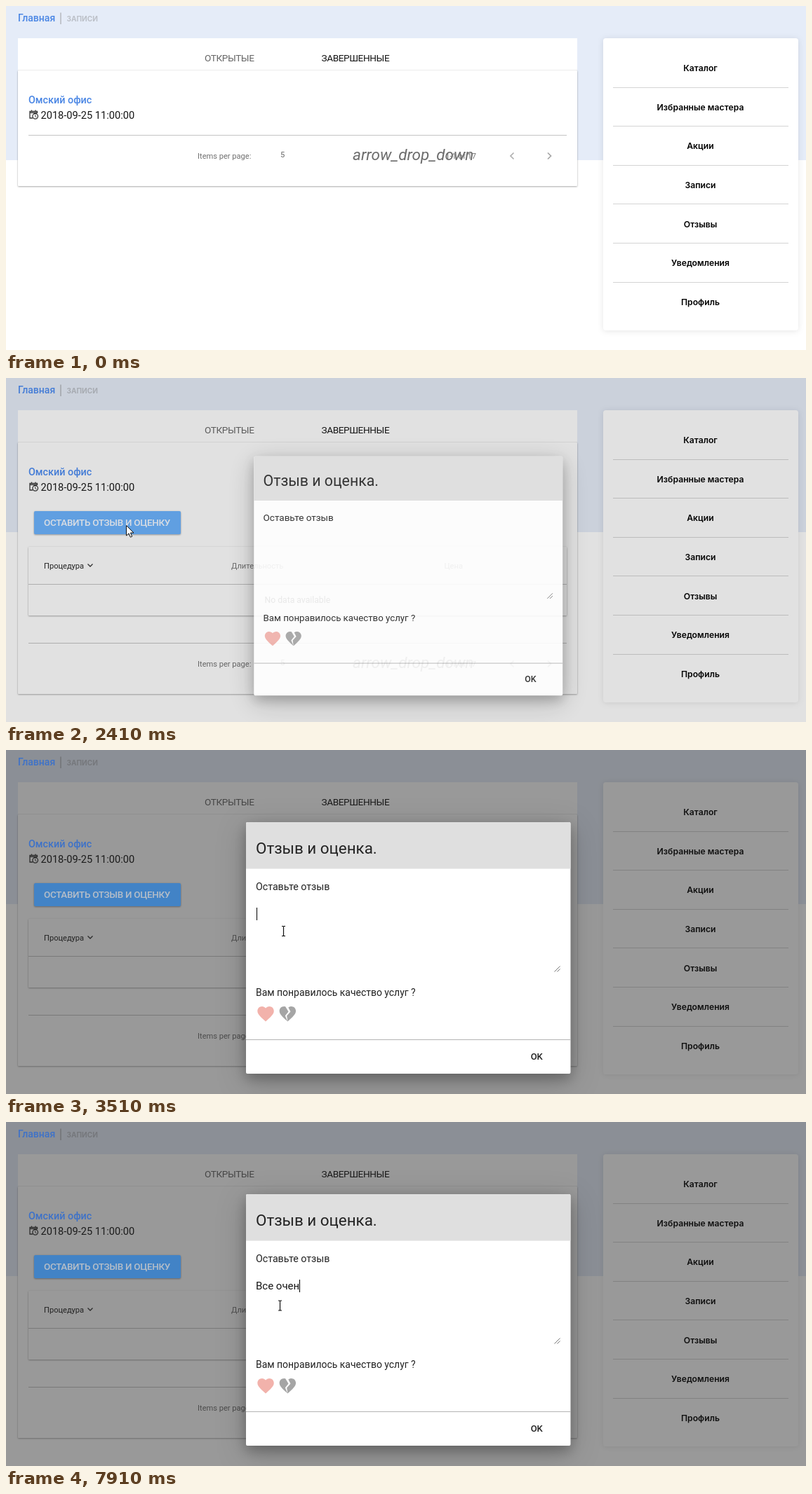
An HTML page for the animation above (8000 ms loop, 1140 by 491 pixels).

```html
<!DOCTYPE html>
<html lang="ru">
<head>
<meta charset="utf-8">
<title>Записи</title>
<style>
html, body { margin: 0; width: 100%; height: 100%; overflow: hidden; background: #fff; }
svg { display: block; width: 1140px; height: 491px; font-family: Roboto, sans-serif; }
text { white-space: pre; }
.card { fill: #fff; filter: drop-shadow(0 1px 1px rgba(0,0,0,.3)) drop-shadow(0 0 1px rgba(0,0,0,.08)); }
.soft { fill: #fff; filter: drop-shadow(0 1px 4px rgba(0,0,0,.1)); }
.modal { fill: #fff; filter: drop-shadow(0 7px 9px rgba(0,0,0,.24)) drop-shadow(0 9px 20px rgba(0,0,0,.2)); }
.menu { font: 600 12.2px Inter, sans-serif; text-anchor: middle; }
.tab { font-size: 13.6px; letter-spacing: -.4px; }
.small { font-size: 11.1px; }
.line { fill: none; stroke: #c4c4c4; }
.chev { fill: none; stroke-width: 1.7; }
</style>
</head>
<body>
<svg id="stage" viewBox="0 0 1140 491">
  <rect width="1140" height="220" fill="#e5ecf8"/>
  <path d="M78 9.5V26" stroke="#b3b5ba" stroke-width="1.4"/>
  <text x="86.5" y="22" font-size="10.1" font-weight="700" font-family="Inter, sans-serif" fill="#bcc0c8">ЗАПИСИ</text>

  <rect class="card" id="panel" x="17" y="92" width="797" height="165" rx="1"/>
  <rect x="17" y="46" width="797" height="46" fill="#fff"/>
  <path d="M17 91.5H814" stroke="#ececec"/>
  <text class="tab" x="283" y="79" fill="#666">ОТКРЫТЫЕ</text>
  <text class="tab" x="449.5" y="79" fill="#161616">ЗАВЕРШЕННЫЕ</text>
  <g fill="none" stroke="#333" stroke-width="1.3">
    <path d="M38 160H34V150.5H44.5V153M34 152.3H44.500M36.500 148.5V151M42 148.5V151"/>
    <circle cx="41.7" cy="157.3" r="3.8"/>
    <path d="M41.7 155.3V157.6L43.3 158.5" stroke-width="1"/>
  </g>
  <text x="49.5" y="160.5" font-size="14.6" fill="#161616">2018-09-25 11:00:00</text>

  <g id="details">
    <rect class="card" x="32" y="241" width="767" height="98" rx="1"/>
    <path class="line" d="M32 294.500H799"/>
    <text class="small" x="54" y="271.5" fill="#222">Процедура</text>
    <path d="M116.500 265.500L120 269L123.500 265.500" fill="none" stroke="#333" stroke-width="1.3"/>
    <text class="small" x="321" y="271.5" fill="#777">Длительность</text>
    <text class="small" x="624.5" y="271.5" fill="#777">Цена</text>
    <text x="368.5" y="320.5" font-size="12.2" fill="#222">No data available</text>
  </g>

  <g id="pager">
    <path class="line" d="M32 184.500H799"/>
    <text class="small" x="273" y="217.5" fill="#707070">Items per page:</text>
    <text class="small" x="391" y="216" fill="#666">5</text>
    <text class="small" x="670" y="217.5" text-anchor="end" fill="#707070">1-1 of 17</text>
    <text x="494" y="220" font-size="22.5" font-style="italic" fill="#6c6c6c">arrow_drop_down</text>
    <path class="chev" d="M723.500 209.500L719 214L723.500 218.500" stroke="#b0b0b0"/>
    <path class="chev" d="M772 209.500L776.500 214L772 218.500" stroke="#a6a6a6"/>
  </g>

  <rect class="soft" x="851" y="46" width="278" height="417" rx="4"/>
  <g id="menu"></g>

  <rect id="shade" width="1140" height="491" fill="#212121"/>

  <g id="links" font-weight="500">
    <text x="17" y="22" font-size="14">Главная</text>
    <text x="32" y="139" font-size="14.3">Омский офис</text>
  </g>
  <g id="button">
    <rect class="card" id="face" x="40" y="190" width="209" height="33" rx="2"/>
    <rect id="flash" x="40" y="190" width="209" height="33" rx="2" fill="#fff"/>
    <text id="label" x="54" y="211.3" font-size="13.4" font-weight="500" letter-spacing="-.28">ОСТАВИТЬ ОТЗЫВ И ОЦЕНКУ</text>
  </g>

  <g id="dialog">
    <rect class="modal" x="342" y="103" width="462.5" height="359" rx="2"/>
    <path d="M342 169.500V105a2 2 0 0 1 2-2H802.500a2 2 0 0 1 2 2V169.500Z" fill="#dfdfdf"/>
    <text x="356" y="147.5" font-size="22.4" fill="#222">Отзыв и оценка.</text>
    <text x="356" y="199.5" font-size="14.2" fill="#222">Оставьте отзыв</text>
    <text id="typed" x="356" y="239" font-size="15" fill="#161616"></text>
    <rect id="caret" y="225" width="1" height="18" fill="#000"/>
    <path d="M781.500 316.500L789.500 308.500M785.500 316.500L789.500 312.500" stroke="#777"/>
    <text x="356" y="350.5" font-size="13.95" fill="#222">Вам понравилось качество услуг ?</text>
    <path transform="translate(356 362.5) scale(1.17)" fill="#f2b2ab" d="M12 21.35L10.55 20.03C5.4 15.36 2 12.28 2 8.5C2 5.42 4.42 3 7.5 3C9.24 3 10.91 3.81 12 5.09C13.09 3.81 14.76 3 16.5 3C19.58 3 22 5.42 22 8.5C22 12.28 18.6 15.36 13.45 20.04Z"/>
    <path transform="translate(387.3 362.5) scale(1.17)" fill="#a5a5a5" d="M12 21.35L10.55 20.03C5.4 15.36 2 12.27 2 8.5C2 5.41 4.42 3 7.5 3C8.17 3 8.82 3.12 9.44 3.33L13 9.35L9 14.35ZM16.5 3C19.58 3 22 5.41 22 8.5C22 12.27 18.6 15.36 13.45 20.03L12 21.35L11 14.35L15.5 9.35L12.85 4.27C13.87 3.47 15.17 3 16.5 3Z"/>
    <path d="M342 413.500H804.500" stroke="#b4b4b4"/>
    <text x="747.8" y="442" font-size="13" font-weight="500" letter-spacing="-.2" fill="#222">OK</text>
  </g>

  <path id="arrow" d="M.5 .5V15L4 11.8L6.3 17.2L8.7 16.2L6.4 11H11Z" fill="#fff" stroke="#111"/>
  <path id="beam" d="M-2.5 -7H-.8L0 -6.3L.8 -7H2.5M0 -6.3V6.3M-2.5 7H-.8L0 6.3L.8 7H2.5" fill="none" stroke="#111" stroke-width="1.2"/>
</svg>
<script>
const LOOP = 8000;
const el = id => document.getElementById(id);
const set = (id, attrs) => {
  for (const k in attrs) el(id).setAttribute(k, attrs[k]);
};
const show = (id, on) => set(id, { display: on ? 'inline' : 'none' });
const clamp = v => Math.max(0, Math.min(1, v));
const mix = (a, b, p) => 'rgb(' + a.map((v, i) => Math.round(v + (b[i] - v) * p)) + ')';

const items = ['Каталог', 'Избранные мастера', 'Акции', 'Записи', 'Отзывы', 'Уведомления', 'Профиль'];
el('menu').innerHTML = items.map((name, i) => {
  const y = Math.floor(116 + 55.6 * i) + 0.5;
  const rule = i < items.length - 1 ? `<path d="M865 ${y}H1115" stroke="#d4d4d4"/>` : '';
  return `<text class="menu" x="989.5" y="${92.8 + 55.7 * i}">${name}</text>${rule}`;
}).join('');

// Pointer moves: start, end, number of jumps, x, y
const moves = [
  [210, 750, 8, 149, 160],
  [900, 1050, 3, 163, 140],
  [1220, 1220, 1, 163, 151],
  [1600, 1940, 5, 171, 210],
  [2870, 2950, 2, 228, 222],
  [3020, 3430, 6, 395.5, 258.5],
  [3710, 3790, 2, 390.5, 262]
];
function pointer(t) {
  let x = 1109, y = 518;
  for (const [from, to, n, tx, ty] of moves) {
    if (t < from) break;
    const jump = n > 1 ? Math.floor((t - from) / (to - from) * (n - 1) + 1e-6) + 1 : 1;
    const p = Math.min(1, jump / n);
    x += (tx - x) * p;
    y += (ty - y) * p;
  }
  return [x, y];
}

// cubic-bezier(.25, .8, .25, 1)
function ease(p) {
  if (p <= 0 || p >= 1) return clamp(p);
  const at = (a, b, u) => 3 * a * u * (1 - u) ** 2 + 3 * b * u * u * (1 - u) + u ** 3;
  let lo = 0, hi = 1;
  for (let i = 0; i < 20; i++) {
    const mid = (lo + hi) / 2;
    if (at(.25, .25, mid) < p) lo = mid; else hi = mid;
  }
  return at(.8, 1, lo);
}

const phrase = 'Все очен';
const keys = [6280, 6430, 6750, 6900, 7130, 7450, 7680, 7910];
const blinks = [3510, 3960, 4490, 5040, 5500, 6050, 6280];

function draw(t) {
  const open = t >= 1220;
  show('details', open);
  show('button', open);
  set('panel', { height: open ? 359 : 165 });
  set('pager', { transform: `translate(0 ${open ? 194 : 0})` });

  // The opening advances in 80 ms ticks
  const tick = 2330 + Math.floor((t - 2330) / 80) * 80;
  const dim = 1 - (1 - clamp((tick - 2340) / 450)) ** 2;
  const tint = clamp(dim * 1.8);
  const flash = clamp((tick - 2160) / 120) * clamp((2490 - tick) / 160);
  set('shade', { opacity: .46 * dim });
  set('links', { fill: mix([74, 134, 228], [62, 114, 200], tint) });
  set('face', { style: 'fill:' + mix([80, 160, 245], [66, 131, 198], tint) });
  set('label', { fill: mix([255, 255, 255], [182, 190, 200], tint) });
  set('flash', { opacity: .25 * flash });

  const p = ease((tick - 2280) / 300);
  const s = .5 + p / 2;
  show('dialog', p > 0);
  set('dialog', { opacity: p, transform: `translate(573.25 282.5) scale(${s}) translate(-573.25 -282.5)` });

  const count = keys.filter(k => t >= k).length;
  const typed = el('typed');
  const text = phrase.slice(0, count);
  if (typed.textContent !== text) typed.textContent = text;
  const end = count ? Math.floor(356.4 + typed.getComputedTextLength()) : 357;
  set('caret', { x: Math.max(357, end) });
  show('caret', count > 0 || blinks.filter(b => t >= b).length % 2 === 1);

  const [x, y] = pointer(t);
  const beam = t > 3000 && x > 354 && y > 222;
  show('arrow', t >= 210 && !beam);
  show('beam', beam);
  set(beam ? 'beam' : 'arrow', { transform: `translate(${x} ${y})` });
}

const start = performance.now();
function frame() {
  draw((performance.now() - start) % LOOP);
  requestAnimationFrame(frame);
}
draw(0);
requestAnimationFrame(frame);
</script>
</body>
</html>
```
